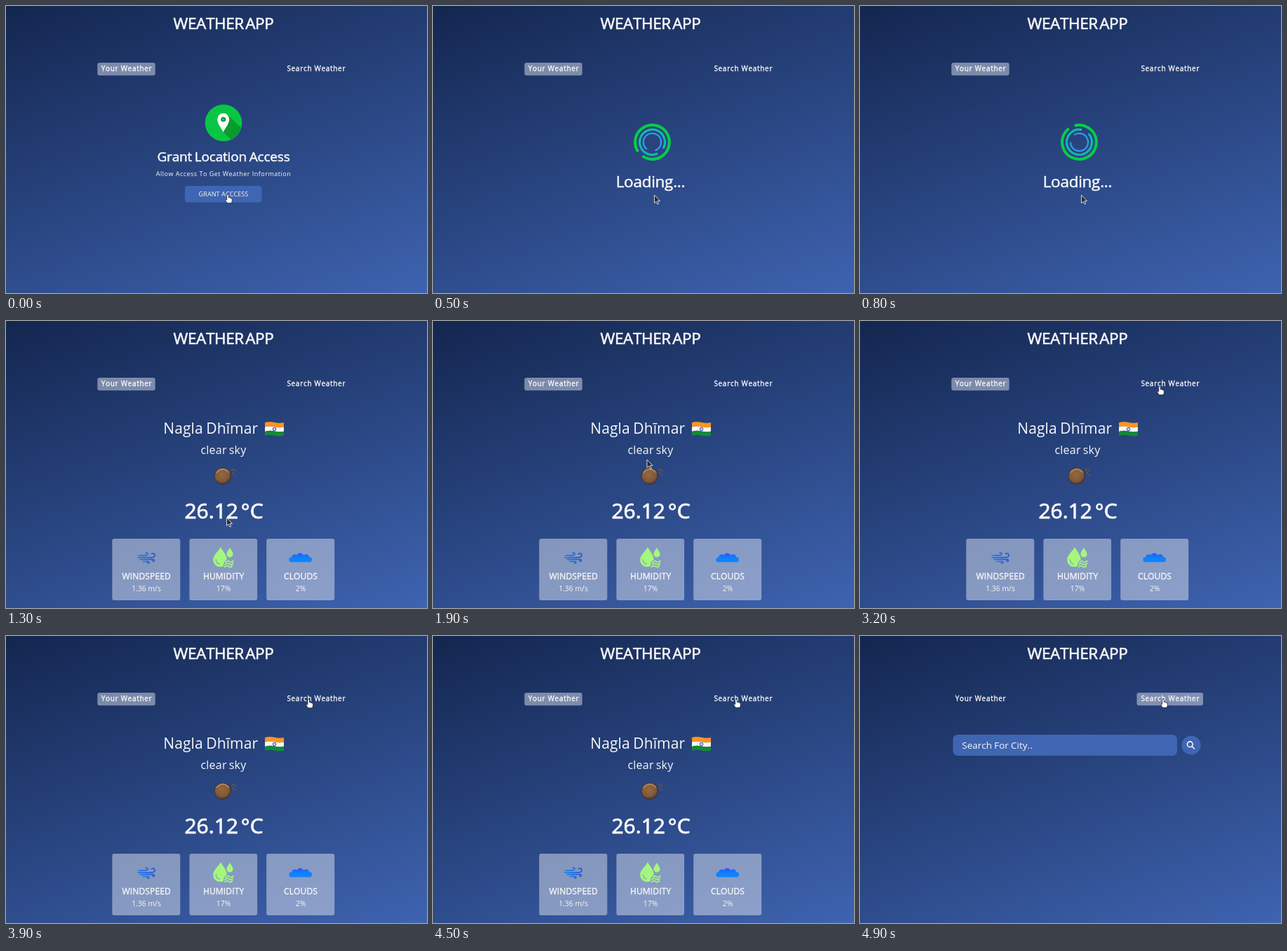
An HTML page that plays this animation: 600x410 px, repeating every 5000 ms.

```html
<!DOCTYPE html>
<html lang="en">
<head>
<meta charset="utf-8">
<title>Weather App</title>
<style>
  html, body { margin: 0; width: 100%; height: 100%; overflow: hidden; }
  body { background: linear-gradient(160deg, #13264f, #3e63b0); }
  svg { display: block; width: 600px; height: 410px; }
  text {
    font-family: "Open Sans", "Noto Sans", sans-serif;
    font-kerning: none;
    fill: #f9f7f7;
    text-anchor: middle;
  }
  .medium { stroke: #f9f7f7; stroke-width: .35px; }
  .title { font-size: 22.5px; letter-spacing: -.4px; word-spacing: -3px; stroke-width: .6px; }
  .tab { font-size: 10px; letter-spacing: .7px; }
  .head { font-size: 19px; letter-spacing: -.18px; word-spacing: -1px; stroke-width: .5px; }
  .note { font-size: 9px; letter-spacing: .49px; }
  .button { font-size: 9px; letter-spacing: .1px; }
  .loading { font-size: 22.5px; letter-spacing: -.28px; stroke-width: .5px; }
  .city { font-size: 21px; letter-spacing: .1px; word-spacing: -1px; }
  .sky { font-size: 16px; letter-spacing: .25px; word-spacing: -1.5px; }
  .temp { font-size: 30px; word-spacing: -4px; stroke-width: .9px; }
  .label { font-size: 12px; letter-spacing: .15px; }
  .value { font-size: 10.4px; }
  .field { font-size: 13.5px; text-anchor: start; word-spacing: -.3px; }
  .glass { fill: rgb(219 226 239 / .5); }
  .blue { fill: #3f66b2; }
  .line { fill: none; stroke-linecap: round; stroke-linejoin: round; }
</style>
</head>
<body>
<svg viewBox="0 0 600 410">
  <defs>
    <clipPath id="disc"><circle cx="310" cy="167" r="26.3"/></clipPath>
    <radialGradient id="ball" cx=".45" cy=".4" r=".62">
      <stop offset="0" stop-color="#95693f"/>
      <stop offset=".7" stop-color="#805838"/>
      <stop offset="1" stop-color="#463330"/>
    </radialGradient>
    <linearGradient id="sea" gradientUnits="userSpaceOnUse" x1="0" y1="332" x2="0" y2="344">
      <stop offset="0" stop-color="#2a58f5"/>
      <stop offset=".6" stop-color="#0d84ff"/>
    </linearGradient>
    <linearGradient id="breeze" gradientUnits="userSpaceOnUse" x1="187" y1="0" x2="214" y2="0">
      <stop offset="0" stop-color="#1f7fe8"/>
      <stop offset="1" stop-color="#1f56cf"/>
    </linearGradient>
  </defs>

  <text class="title medium" x="310" y="32.8">WEATHER APP</text>
  <rect id="tab" class="glass" y="81" height="18.2" rx="3"/>
  <text class="tab medium" x="172" y="93.3">Your Weather</text>
  <text class="tab medium" x="442.3" y="93.3">Search Weather</text>

  <g id="grant">
    <circle cx="310" cy="167" r="26.3" fill="#08c644"/>
    <path d="M315.5 155L342 181V200H330L309.6 180Z" fill="#0a9b2c" clip-path="url(#disc)"/>
    <path d="M309.7 180.3C307 174 301.2 168.5 301.2 161.8a8.5 8.5 0 0 1 17 0C318.2 168.5 312.4 174 309.7 180.3Z" fill="#fff"/>
    <circle cx="309.7" cy="162" r="3.5" fill="#079c35"/>
    <circle cx="309.7" cy="162" r="1.2" fill="#38cf63"/>
    <text class="head medium" x="310" y="222">Grant Location Access</text>
    <text class="note" x="310" y="243.4">Allow Access To Get Weather Information</text>
    <rect class="blue" x="255" y="257" width="109.5" height="23.5" rx="3.5"/>
    <text class="button" x="310" y="271.7">GRANT ACCCESS</text>
  </g>

  <g id="loading">
    <g class="line" transform="translate(312.5 194.5)" style="stroke-linecap:butt">
      <circle class="ring" r="24.4" pathLength="360" stroke="#06ce48" stroke-width="4" stroke-dasharray="339 21"/>
      <circle class="ring" r="18" pathLength="360" stroke="#12b6ae" stroke-width="3.2" stroke-dasharray="325 35"/>
      <circle class="ring" r="12.6" pathLength="360" stroke="#2f9ee6" stroke-width="2.2" stroke-dasharray="305 55"/>
    </g>
    <text class="loading medium" x="310" y="259">Loading...</text>
  </g>

  <g id="weather">
    <text class="city" x="291.7" y="161">Nagla Dhīmar</text>
    <path d="M369 145Q375.5 143 382.5 144.8T396 145V151.4Q389 153 382.5 151.3T369 151.5Z" fill="#ff9422"/>
    <path d="M369 151.5Q375.5 149.6 382.5 151.3T396 151.4V157.7Q389 159.3 382.5 157.6T369 157.9Z" fill="#f7f7f7"/>
    <path d="M369 157.9Q375.5 156 382.5 157.6T396 157.7V163.8Q389 165.4 382.5 163.6T369 164Z" fill="#128a35"/>
    <circle cx="382.5" cy="154.5" r="2.3" fill="#c9cdf0" stroke="#2d3d9b" stroke-width=".9"/>
    <text class="sky" x="310" y="190">clear sky</text>
    <circle cx="308.8" cy="221.4" r="11.8" fill="url(#ball)" stroke="#352e3a" stroke-width=".9"/>
    <path class="line" d="M300.2 216.5Q308.5 207.5 317.4 216" stroke="#b08a62" stroke-width="1.6"/>
    <g fill="#62504e">
      <circle cx="322.8" cy="212.3" r="1.7"/><circle cx="326.3" cy="213.6" r="1.5"/>
      <circle cx="323.4" cy="217.2" r="1.5"/><circle cx="326.2" cy="220" r="1.4"/>
    </g>
    <text class="temp medium" x="310.5" y="281.8">26.12 °C</text>

    <rect class="glass" x="151.3" y="311" width="97" height="88" rx="3"/>
    <rect class="glass" x="261.4" y="311" width="96.7" height="88" rx="3"/>
    <rect class="glass" x="371.2" y="311" width="97" height="88" rx="3"/>

    <g class="line" stroke="url(#breeze)" stroke-width="1.7">
      <path d="M189 334.8H199Q202.2 334.6 202 332.6Q201.4 330.6 199.2 331.4"/>
      <path d="M188 337.8H207.5Q212.6 337.2 212 334Q210.6 331 207.4 332.6"/>
      <path d="M191 340.7H209Q212.4 341 211 343Q209.6 343.8 208.8 342.8"/>
      <path d="M195 343.5H202Q205 344 203.5 345.8Q202 346.4 201.4 345.4"/>
    </g>
    <g fill="#a4f77d">
      <path d="M306 323C309 329 314.8 334.5 314.8 341Q310.5 342.8 309.5 350.4Q308 351.2 305.5 351.2C299.5 351.2 295.2 347 295.2 341C295.2 334.5 303 329 306 323Z"/>
      <path d="M319 324C320.8 327.2 323.6 330 323.6 333a4.6 4.6 0 0 1-9.2 0C314.4 330 317.2 327.2 319 324Z"/>
    </g>
    <g class="line" stroke="#a4f77d" stroke-width="1.8">
      <path d="M313 344.6Q315.8 341.5 318.3 343.8T323.8 342.6"/>
      <path d="M311.8 348.1Q315 345 318 347.3T323.4 346.1"/>
      <path d="M311.5 351.3Q314.6 348.6 317.4 350.8T322.5 349.5"/>
    </g>
    <path class="line" d="M299.2 341Q299.7 346 304 347.2" stroke="#8ba8b8" stroke-width="1.4"/>
    <g fill="url(#sea)">
      <circle cx="407" cy="340.8" r="3.6"/><circle cx="411.5" cy="337.6" r="4.1"/>
      <circle cx="419.3" cy="337" r="5.4"/><circle cx="427.8" cy="337.6" r="4.3"/>
      <circle cx="432.5" cy="340.8" r="3.6"/>
      <rect x="407" y="337.5" width="25.5" height="6.9"/>
    </g>

    <g class="medium">
      <text class="label" x="200.2" y="368.5">WINDSPEED</text>
      <text class="label" x="310.2" y="368.5">HUMIDITY</text>
      <text class="label" x="420" y="368.5">CLOUDS</text>
    </g>
    <text class="value" x="200" y="386">1.36 m/s</text>
    <text class="value" x="310" y="386">17%</text>
    <text class="value" x="420" y="386">2%</text>
  </g>

  <g id="search">
    <rect class="blue" x="132.5" y="141" width="319.5" height="30" rx="6.5"/>
    <text class="field" x="145.3" y="161">Search For City..</text>
    <circle class="blue" cx="472" cy="156" r="13.6"/>
    <g class="line" stroke="#f9f7f7" stroke-width="1.6">
      <circle cx="470.3" cy="154.8" r="3.9"/>
      <path d="M473.2 157.7L476.5 161"/>
    </g>
  </g>

  <g id="cursor">
    <path id="arrow" d="M0 0V11.5L2.6 9.2L4.4 13.2L6.2 12.4L4.5 8.5H8Z" fill="#2a2a30" stroke="#e8e8f0" stroke-width=".9"/>
    <path id="hand" d="M-1.3 .8Q0 -1 1.3 .8V4.6Q2.8 3.8 3.2 5Q4.6 4.4 4.9 5.6Q6.4 5.2 6.3 7V9.5L5.3 12.3H-.8L-3.3 8.2Q-3.6 6.4 -1.3 7.6Z" fill="#fff" stroke="#1c2030" stroke-width=".8"/>
  </g>
</svg>
<script>
  const LOOP = 5000, STEP = 100;
  const $ = id => document.getElementById(id);
  const rings = document.querySelectorAll('.ring');

  // start time of each screen
  const screens = [[0, 'grant'], [400, 'loading'], [1000, 'weather'], [4700, 'search']];

  // time, x, y of the pointer
  const path = [
    [0, 316, 269.3], [400, 315.5, 270], [1000, 315.5, 270], [1300, 314.5, 281],
    [1500, 314.5, 281], [1900, 305, 198], [2500, 408, 118], [3000, 427, 93.3],
    [3600, 427, 93.3], [4000, 432, 90], [LOOP, 432, 90]
  ];

  // start angle at 800 ms, degrees per ms
  const spins = [[-106, .36], [-43, -.36], [-125, .36]];

  const show = (id, on) => $(id).setAttribute('visibility', on ? 'visible' : 'hidden');

  function pointAt(t) {
    const i = path.findIndex(p => p[0] > t);
    const [t0, x0, y0] = path[i - 1], [t1, x1, y1] = path[i];
    const k = (t - t0) / (t1 - t0), e = k * k * (3 - 2 * k);
    return [x0 + (x1 - x0) * e, y0 + (y1 - y0) * e];
  }

  function draw(t) {
    const current = screens.filter(s => s[0] <= t).pop()[1];
    screens.forEach(([, id]) => show(id, id === current));

    const searching = current === 'search';
    $('tab').setAttribute('x', searching ? 394.5 : 130.3);
    $('tab').setAttribute('width', searching ? 94.5 : 82.4);

    rings.forEach((ring, i) => {
      const [angle, speed] = spins[i];
      ring.setAttribute('transform', `rotate(${angle + speed * (t - 800)})`);
    });

    const [x, y] = pointAt(t);
    const hover = current === 'grant' || (x > 394 && y < 99.5);
    $('cursor').setAttribute('transform', `translate(${x} ${y})`);
    show('hand', hover);
    show('arrow', !hover);
  }

  function tick() {
    draw(Math.floor(performance.now() % LOOP / STEP) * STEP);
    requestAnimationFrame(tick);
  }
  tick();
</script>
</body>
</html>
```
